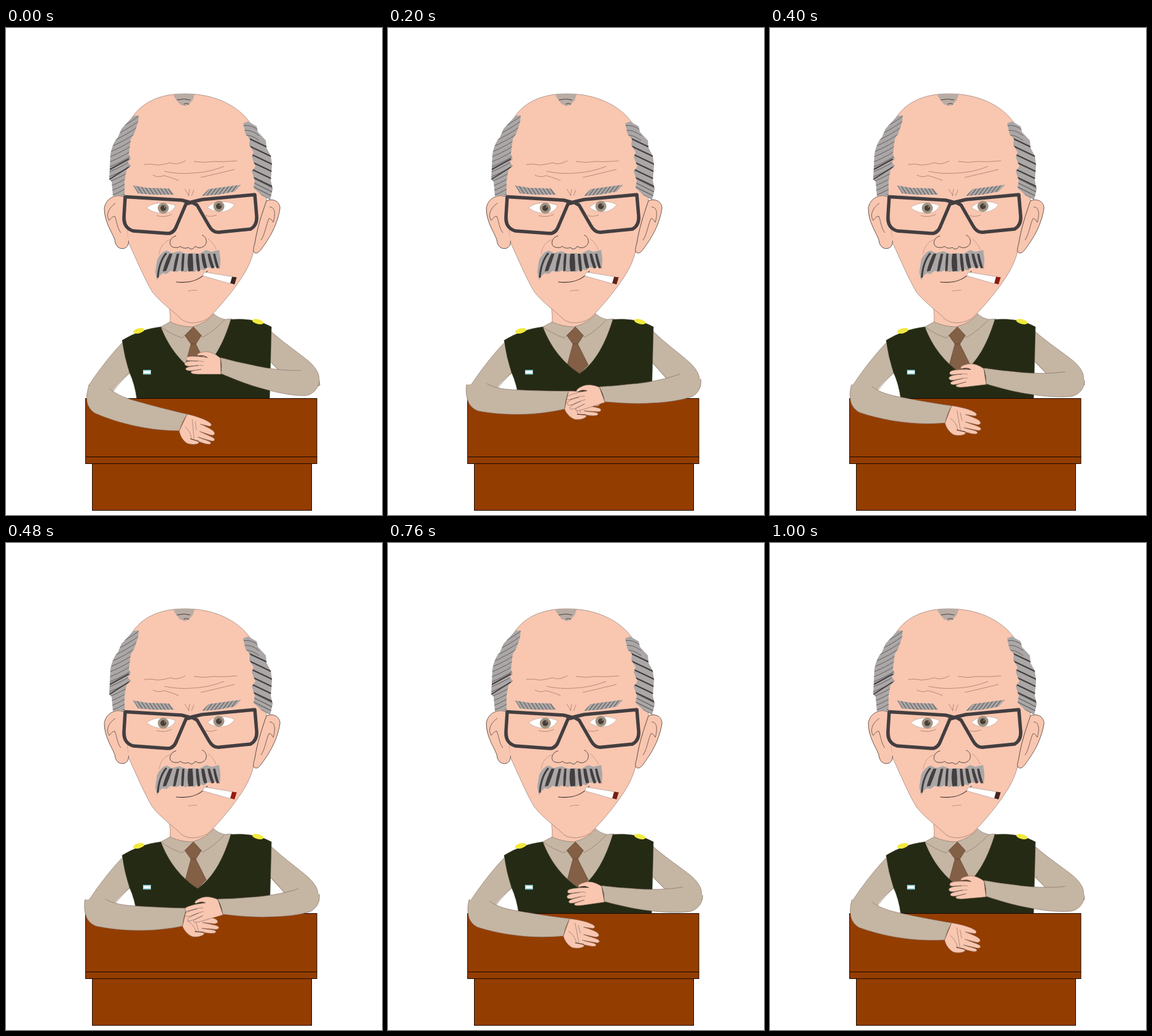
Animation, 612 px wide and 792 px high, one loop 1040 ms. Source, as an HTML page with a canvas:

```html
<!DOCTYPE html>
<html lang="en">
<head>
<meta charset="utf-8">
<title>Man at a desk</title>
<style>
html, body { margin: 0; width: 100%; height: 100%; overflow: hidden; background: #fff; }
canvas { display: block; }
</style>
</head>
<body>
<canvas id="stage" width="612" height="792"></canvas>
<script>
const ctx = document.getElementById('stage').getContext('2d');
const LOOP = 1040, STEP = 40;
const SKIN = '#f9c6b0', CLOTH = '#c5b5a3', VEST = '#252a14', WOOD = '#943d00',
  HAIR = '#aaa7a6', DARK = '#433e40', STRAND = '#625d5e', TIE = '#835f45', LINE = '#7d6a60';

function fill(d, color) {
  ctx.fillStyle = color;
  ctx.fill(new Path2D(d));
}

function stroke(d, color = LINE, width = 0.6) {
  ctx.strokeStyle = color;
  ctx.lineWidth = width;
  ctx.stroke(new Path2D(d));
}

function shape(d, color, line = LINE, width = 0.6) {
  fill(d, color);
  stroke(d, line, width);
}

function oval(x, y, rx, ry, color, turn = 0) {
  ctx.beginPath();
  ctx.ellipse(x, y, rx, ry, turn, 0, Math.PI * 2);
  ctx.fillStyle = color;
  ctx.fill();
}

// Grey patch of hair with strands kept inside it
function hair(d, strands) {
  ctx.save();
  fill(d, HAIR);
  ctx.clip(new Path2D(d));
  strands();
  ctx.restore();
}

// Draws inside a frame turned about a pivot, optionally shifted
function turned(x, y, angle, dx, draw) {
  ctx.save();
  ctx.translate(x + dx, y);
  ctx.rotate(angle);
  ctx.translate(-x, -y);
  draw();
  ctx.restore();
}

const tri = p => Math.abs(1 - 2 * (p - Math.floor(p)));
const rad = deg => deg * Math.PI / 180;

function upperArms(v) {
  fill('M189 512C167 535 148 561 135 581L131 600L165 605L172 594C180 580 190 571 204 560Z', CLOTH);
  stroke('M189 512C167 535 148 561 134 582');
  stroke('M202 559C192 570 182 580 174 592');
  turned(432, 500, 0.155 * v * v - 0.0878 * v, 0, () => {
    fill('M430 492C452 512 476 528 493 542C502 550 508 559 509 565L511 581L505 584L475 590L428 541Z', CLOTH);
    stroke('M432 494C452 512 476 528 493 542C502 550 508 559 509 565L511 581L507 582');
    stroke('M430 542L462 575');
  });
}

function body() {
  fill('M267 450L267 482L300 492L340 470L335 450Z', SKIN);
  stroke('M266 455Q268 468 267 479');
  shape('M252 486L267 478Q285 486 303 486Q326 480 338 465Q346 472 356 474L367 473L350 560L270 560Z', CLOTH);
  stroke('M252 486Q270 499 287 504L305 486L320 503Q340 492 356 474');
  shape('M305 486L318 500L309 514L301 514L291 500Z', TIE, '#5c4030');
  shape('M301 514L309 514L326 548L312 562L292 547Z', TIE, '#5c4030');
  shape('M189 508Q218 490 252 486C264 518 285 545 312 562C339 543 355 510 366 474Q405 471 432 486L429 604L213 604Q210 580 201 560Q193 536 189 508Z', VEST, '#40432f');
  oval(216, 492.5, 9.5, 4, '#f1e93e', -0.25);
  oval(410, 477.5, 9.5, 3.8, '#f1e93e', 0.25);
  ctx.fillStyle = '#8fcfd8';
  ctx.fillRect(223, 556, 13, 7.5);
  ctx.fillStyle = '#fff';
  ctx.fillRect(224, 558, 11, 3.5);
}

function desk() {
  ctx.fillStyle = WOOD;
  ctx.strokeStyle = '#160900';
  ctx.lineWidth = 1;
  for (const [x, y, w, h] of [[140.5, 708.5, 357, 76], [129.5, 602.5, 376.5, 95], [129.5, 697.5, 376.5, 11]]) {
    ctx.fillRect(x, y, w, h);
    ctx.strokeRect(x, y, w, h);
  }
}

function leftForearm() {
  shape('M295 628C308 631 324 636 332 642C337 646 333 649 328 647L316 644C325 648 334 652 338 656C342 661 338 663 333 662L315 656C325 661 334 664 338 667C342 671 337 673 332 671L312 665C320 669 331 671 333 674C335 678 328 677 324 676L300 668C306 670 313 671 314 674C313 678 300 678 294 675C287 670 283 662 282 655Z', SKIN);
  stroke('M291 648Q300 655 302 668M303 636L306 668M308 640L310 654');
  stroke('M300 668L314 672', '#4a2c20', 0.9);
  const edge = 'M168 586C180 597 198 603 213 607C238 614 268 622 295 628Q287 640 282 655C235 655 185 644 144 626Q134 619 132 608Q130 595 135.5 580';
  fill(edge + 'Z', CLOTH);
  stroke(edge);
}

function rightForearm() {
  shape('M349 537C340 529 330 525 321 527C312 528 309 532 314 533C320 532 325 533 327 536C315 534 300 533 295 535C291 538 293 541 298 541L312 542C302 541 293 542 291 545C290 549 294 550 300 550L313 549C304 550 296 551 293 553C291 557 297 558 304 557L318 555C310 557 303 557 301 559C300 563 310 563 318 563L350 563Z', SKIN);
  stroke('M297 541.5Q312 540 322 543M300 550Q314 548 321 549');
  stroke('M314 533Q322 532 328 536', '#4a2c20', 0.9);
  const edge = 'M480 557C455 558 420 553 400 548Q374 543 349 536Q352 549 350 562C374 572 396 581 420 587C448 595 470 598 486 598C499 597 508 587 510 575';
  fill(edge + 'Z', CLOTH);
  stroke(edge);
}

function head() {
  shape('M293 107C246 106 217 125 204 148L190 200L191 272L199 348C212 376 224 405 238 429C252 447 274 462 286 474C297 482 314 481 329 472C350 452 382 413 394 388C402 371 404 360 405 350C409 325 416 304 424 281L420 250L404 165C385 128 341 107 293 107Z', SKIN);
  const leftEar = 'M191 274C176 269 162 279 160 293C160 315 172 331 177 344C178 355 184 360 192 358.5Q200 356 199.5 346';
  const rightEar = 'M424 281C437 276 446 284 446 293C441 326 423 349 416 359C411 366 407 368 403 364C402 359 404 354 405 350';
  fill(leftEar + 'L192 300Z', SKIN);
  stroke(leftEar, '#584840', 0.9);
  fill(rightEar + 'C409 325 416 304 424 281Z', SKIN);
  stroke(rightEar + 'C409 325 416 304 424 281', '#584840', 0.9);
  stroke('M178 285C165 294 163 306 168 313Q173 306 177 306C181 316 181 326 187 333', '#584840', 0.8);
  stroke('M429 291C438 291 439 302 435 316Q431 309 428 310C423 320 422 335 415 345', '#584840', 0.8);
}

function headHair() {
  hair('M216 142L215 153L209 171L203 181L200 205L203 213L198 218L203 224L196 231L193 248L193 272L174 273L172 250L168 246L170 205Q174 185 182 178L188 164L199 152L207 143Z', () => {
    for (let y = 154; y < 285; y += 8) stroke(`M168 ${y + 16}Q194 ${y + 6} 218 ${y - 12}`, STRAND, 1);
    stroke('M169 230L200 213M167 247L200 226', DARK, 2);
  });
  hair('M386 155L394 152L408 160L410 169L423 183L424 195L431 208L433 223L431 248L434 262L430 279L416 272L403 260L405 248L400 233L406 225L400 210L403 202L396 190L397 180L390 173Z', () => {
    for (let y = 157; y < 175; y += 8) stroke(`M386 ${y + 2}q12 -3 26 8`, STRAND, 1);
    for (let y = 179; y < 240; y += 12) stroke(`M394 ${y}l40 19`, DARK, 2.2);
    for (let y = 243; y < 270; y += 7) stroke(`M400 ${y}l36 18`, STRAND, 1.2);
  });
  fill('M272 109Q290 105 307 108L304 117L297 125L291 127L283 124Q277 117 272 109Z', '#b9aca4');
  stroke('M278 117Q290 114 300 117M289 124Q293 121 298 124', DARK, 1);
}

function eye(d, x, y) {
  shape(d, '#fff', '#a88d80', 0.5);
  oval(x, y, 9, 9, '#a39380');
  oval(x, y, 4.7, 4.7, '#453f3a');
  oval(x + 2, y - 2, 1.2, 1.2, '#8d8378');
}

function brows() {
  hair('M207 256L230 260L265 261L274 271L240 271L215 269Z', () => {
    for (let x = 207; x < 270; x += 6) stroke(`M${x} 256l11 17`, STRAND, 1.2);
  });
  hair('M319 273L330 262L382 255L372 266L345 271Z', () => {
    for (let x = 320; x < 380; x += 6) stroke(`M${x} 274l15 -20`, STRAND, 1.2);
  });
}

function glasses() {
  ctx.lineJoin = 'round';
  stroke('M194 274.5L286 280L301 284L293 286L278 321Q273 335 262 334L207 330Q191 325 192 307Z', DARK, 5.5);
  stroke('M405 271L319 279L302 283L311 288L330 321Q337 334 348 332L398 327Q409 321 408 306Z', DARK, 5.5);
  ctx.lineJoin = 'miter';
}

function face() {
  stroke('M225 222Q235 220 247 223Q258 222 268 219Q277 224 292 216M306 217Q322 220 338 217Q354 218 376 216M258 233Q280 238 303 236Q330 235 355 225M239 239Q248 244 257 240Q269 243 281 248M317 243Q335 239 372 230', '#a37b6a', 0.8);
  stroke('M291 262L298 273M299 262L297 273M306 263L302 273', '#a37b6a', 0.8);
  brows();
  eye('M229 292C240 283 262 282 276 289C271 299 262 303 250 301Q236 299 229 292Z', 256, 293);
  eye('M328 292C336 282 356 279 372 287C367 296 355 300 345 299Q334 297 328 292Z', 346.5, 290);
  stroke('M245 305Q258 309 270 303M325 305Q333 308 343 304', '#a37b6a', 0.8);
  glasses();
  stroke('M277 338C266 340 262 356 275 357Q281 358 284 355Q289 360 297 357Q303 363 308 355Q315 360 322 355C330 349 325 338 319 337', '#584840', 1);
  stroke('M249 368Q252 349 267 344M329 343Q338 349 342 360', '#c18f7b', 0.8);
}

function moustache() {
  fill('M246 410L243 397L246 377Q253 363 262 362L270 366L282 363L293 367L306 366L313 368L326 361L334 364L347 361L349 376L348 392L340 388L337 391L328 389L323 394L313 392L306 397L298 395L292 397L284 394L277 397L268 395L261 400L255 399L250 403Z', HAIR);
  // top x, lean of the tip, half width
  const locks = [[267, -9, 4], [279, -5, 3], [288, -1, 2.5], [298, 3, 5.5], [310, 4, 3], [319, 6, 3.5], [329, 8, 3], [338, 7, 2.5]];
  for (const [x, lean, w] of locks) {
    const drop = x > 315 ? 24 : 29;
    fill(`M${x - 1} 367Q${x + lean / 2 - w} 381 ${x + lean - w * 0.7} ${367 + drop}L${x + lean + w * 0.7} ${366 + drop}Q${x + lean / 2 + w} 381 ${x + w} 367Z`, DARK);
  }
  stroke('M261 366Q249 380 247 406', DARK, 3);
}

function mouth(glow) {
  stroke('M277 413C302 416 318 408 328 395', '#40322d', 1.2);
  stroke('M296 428Q302 426 311 426.5', '#b48472', 0.8);
  shape('M323 397L369 404.5L366 416L320 403Z', '#fff', '#8a7d77', 0.5);
  const mix = (a, b) => Math.round(a + (b - a) * glow);
  fill('M368 404.5L375.5 405.5L372 417L365 415Z', `rgb(${mix(60, 162)},${mix(37, 25)},${mix(32, 14)})`);
}

function draw(t) {
  const v = 1 - tri(t * 3 / LOOP);
  const glow = 1 - tri(t / LOOP);
  ctx.fillStyle = '#fff';
  ctx.fillRect(0, 0, 612, 792);
  upperArms(v);
  body();
  desk();
  head();
  headHair();
  face();
  moustache();
  mouth(glow);
  turned(131, 614, rad(-15.5 * v), 0, leftForearm);
  turned(496, 576, rad(-21.3 * v), 15 * v * (0.85 - v), rightForearm);
}

const start = performance.now();
function tick() {
  const t = (performance.now() - start) % LOOP;
  draw(Math.floor(t / STEP) * STEP);
  requestAnimationFrame(tick);
}
tick();
</script>
</body>
</html>
```
